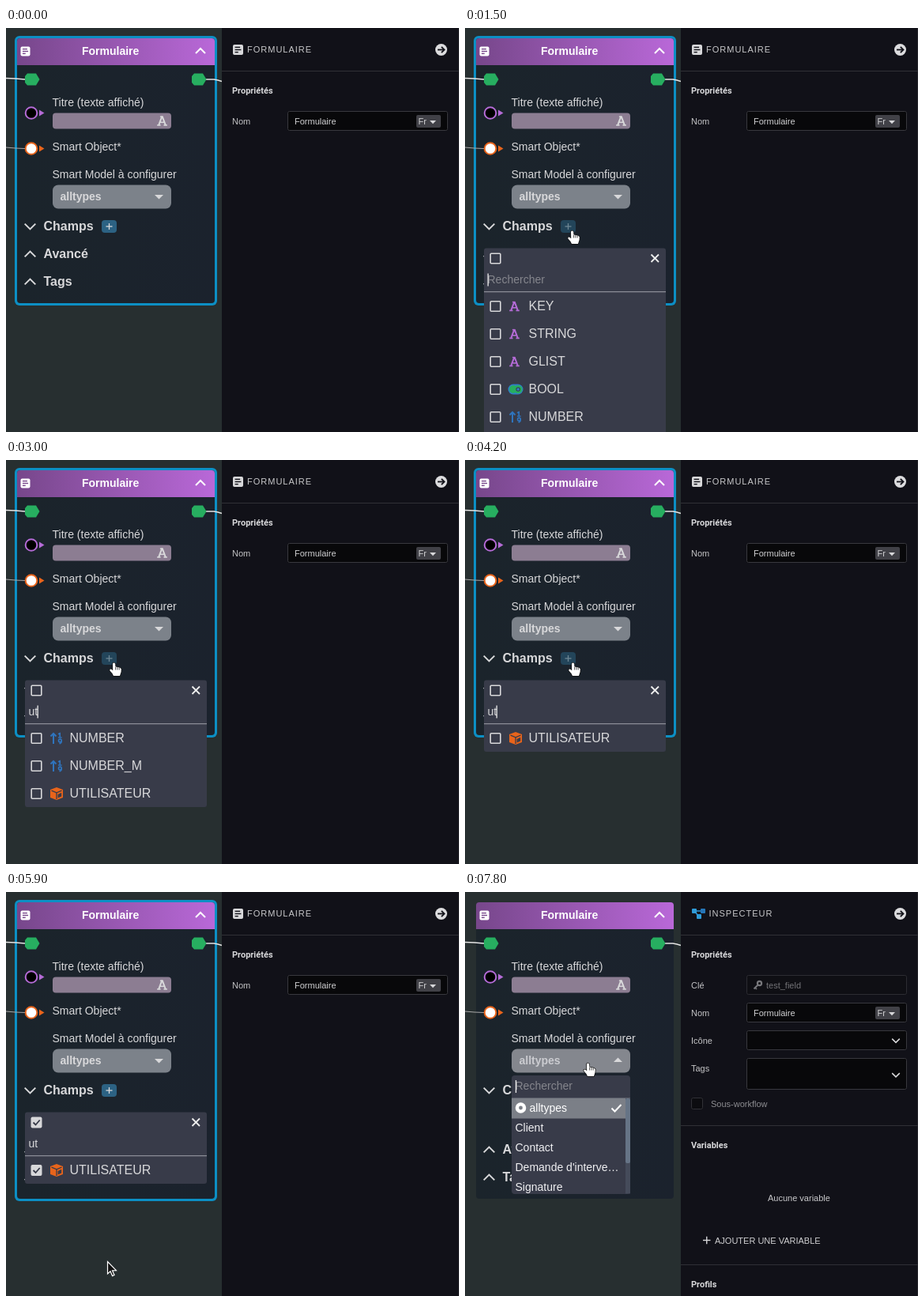
These frames come from a looping animation (573x511 px, 8 s). An HTML page with a canvas:

```html
<!DOCTYPE html>
<html lang="fr">
<head>
<meta charset="utf-8">
<title>Formulaire</title>
<style>
html, body { margin: 0; width: 100%; height: 100%; overflow: hidden; background: #272f30; }
canvas { display: block; width: 573px; height: 511px; }
</style>
</head>
<body>
<canvas id="stage" width="573" height="511"></canvas>
<script>
const LOOP = 8000, STEP = 100;
const ctx = document.getElementById('stage').getContext('2d');
const SANS = '"Liberation Sans", Arial, sans-serif';
const ROBOTO = 'Roboto, sans-serif';
const LIGHT = '#d8d8da', PURPLE = '#b46bd6', ORANGE = '#e8641b', GREEN = '#27ae60', BLUE = '#2f74bd';
const POPUP = '#383b49';

// start, end, x, y, shape: the pointer glides to x,y during start..end
const MOVES = [
  [200, 300, 251, 430, 'arrow'], [300, 700, 170, 318, 'arrow'], [700, 1000, 139, 260, 'arrow'],
  [1000, 1100, 135, 256, 'hand'], [1600, 1700, 134, 255, 'hand'], [2000, 2100, 135, 256, 'hand'],
  [2400, 2500, 136, 256, 'hand'], [4200, 4300, 137, 264, 'hand'], [4300, 4400, 140, 284, 'arrow'],
  [4400, 4500, 146, 304, 'arrow'], [4500, 4600, 152, 328, 'text'], [4700, 4800, 153, 334, 'text'],
  [4800, 4900, 154, 341, 'hand'], [5000, 5100, 148, 341, 'hand'], [5400, 5500, 138, 420, 'arrow'],
  [5500, 5600, 129, 466, 'arrow'], [5800, 5900, 128, 467, 'arrow'], [6400, 6900, 142, 341, 'arrow'],
  [6900, 7300, 155, 228, 'arrow'], [7300, 7500, 155, 216, 'hand']
];

function text(str, x, y, size, color = LIGHT, weight = 400, family = SANS, spacing = 0) {
  ctx.font = `${weight} ${size}px ${family}`;
  ctx.letterSpacing = spacing + 'px';
  ctx.fillStyle = color;
  ctx.fillText(str, x, y);
}
function rect(x, y, w, h, color, r = 0) {
  ctx.fillStyle = color;
  ctx.beginPath();
  ctx.roundRect(x, y, w, h, r);
  ctx.fill();
}
function frame(x, y, w, h, color, r = 0, width = 1) {
  ctx.strokeStyle = color;
  ctx.lineWidth = width;
  ctx.beginPath();
  ctx.roundRect(x, y, w, h, r);
  ctx.stroke();
}
function trace(pts) {
  ctx.beginPath();
  for (let i = 0; i < pts.length; i += 2) ctx.lineTo(pts[i], pts[i + 1]);
}
function line(color, width, ...pts) {
  ctx.strokeStyle = color;
  ctx.lineWidth = width;
  trace(pts);
  ctx.stroke();
}
function poly(color, ...pts) {
  ctx.fillStyle = color;
  trace(pts);
  ctx.fill();
}
function disc(x, y, r, fill, stroke, width = 2) {
  ctx.beginPath();
  ctx.arc(x, y, r, 0, 7);
  if (fill) { ctx.fillStyle = fill; ctx.fill(); }
  if (stroke) { ctx.strokeStyle = stroke; ctx.lineWidth = width; ctx.stroke(); }
}
function chevron(x, y, w, h, width, color = LIGHT) {
  line(color, width, x - w, y - h, x, y + h, x + w, y - h);
}
function at(x, y, draw) {
  ctx.save();
  ctx.translate(x, y);
  draw();
  ctx.restore();
}

function letterIcon(x, y, color) {
  at(x, y, () => {
    line(color, 2.1, -4.2, 5, -.4, -5, .4, -5, 4.2, 5);
    line(color, 1.6, -3, 1.8, 3, 1.8);
    line(color, 1.7, -6.3, 5.4, -2, 5.4);
    line(color, 1.7, 2, 5.4, 6.3, 5.4);
    line(color, 1.5, -2.6, -5.4, .8, -5.4);
  });
}
function boolIcon(x, y) {
  rect(x - 9.5, y - 6.5, 19, 13, '#2f80c8', 6.5);
  disc(x - 3, y, 5, GREEN);
  disc(x + 3.2, y, 4, POPUP, GREEN, 2.4);
  disc(x + 3.2, y, 1.8, '#2f80c8');
}
function numberIcon(x, y) {
  at(x, y, () => {
    line(BLUE, 2, -4, 7, -4, -5);
    line(BLUE, 2, -7.5, -2.5, -4, -6, -.5, -2.5);
    line(BLUE, 1.6, 2, -5.2, 4.2, -6.2, 4.2, -1.2);
    line(BLUE, 1.4, 2, -1, 6.6, -1);
    disc(4.4, 3, 1.9, null, BLUE, 1.6);
    line(BLUE, 1.6, 6.2, 3, 5.8, 5.6, 3.6, 7);
  });
}
function cubeIcon(x, y) {
  at(x, y, () => {
    poly(ORANGE, 0, -8, 8, -5, 8, 5, 0, 8, -8, 5, -8, -5);
    line(POPUP, 1.3, -6.5, -3.8, 0, -1.2, 6.5, -3.8);
    line(POPUP, 1.3, 0, -1.2, 0, 7);
    poly(POPUP, 1.6, 1, 6.2, -1.2, 6.2, 3.4, 1.6, 5.4);
  });
}
function formIcon(x, y, size, color, ink) {
  rect(x, y, size, size, color, 2);
  [[.2, .26, .5], [.2, .5, .6], [.2, .74, .32]].forEach(([a, b, w]) =>
    line(ink, 1.4, x + a * size, y + b * size, x + (a + w) * size, y + b * size));
}
function checkbox(x, y, on) {
  if (on) {
    rect(x - 7, y - 7, 14, 14, LIGHT, 2);
    line(POPUP, 1.8, x - 4, y, x - 1, y + 3, x + 4.2, y - 3);
  } else frame(x - 6.3, y - 6.3, 12.6, 12.6, LIGHT, 1, 1.6);
}
function caret(x, y, color = '#eee') { rect(x, y, 1.3, 16, color); }

function port(x, y, color, fill) {
  disc(x, y, 7.3, fill, color, 2);
  poly(color, x + 10, y - 4, x + 16.5, y, x + 10, y + 4);
}
function flowPort(x) {
  poly(GREEN, x, 61, x + 3, 57.5, x + 14, 57.5, x + 18.5, 65, x + 14, 72.5, x + 3, 72.5, x, 69);
}
function wires() {
  line('#e4e4e4', 1.6, 0, 63.5, 12, 64, 24, 65);
  line('#a8a8a8', 1, 0, 151, 12, 152, 24, 152.5);
  line('#e4e4e4', 1.6, 253, 65, 263, 65, 268, 66, 273, 67.5);
}

function section(label, y, open) {
  chevron(30.5, y + .5, 6.8, open ? 3.4 : -3.4, 2);
  text(label, 47.5, y + 5.5, 16, LIGHT, 700);
}
function card(t) {
  const selected = t < 6100, added = t >= 5100, opened = t >= 7800;
  const shift = added ? 40 : 0;
  const h = 335 + shift;
  if (selected) rect(11, 10, 256, h + 6, '#0c8fc4', 6);
  const body = ctx.createLinearGradient(14, 0, 264, 0);
  body.addColorStop(0, '#1b242b');
  body.addColorStop(1, '#1b222d');
  rect(14, 13, 250, h, body, 4);
  const head = ctx.createLinearGradient(14, 0, 264, 0);
  head.addColorStop(0, '#77478b');
  head.addColorStop(1, '#b968d8');
  rect(14, 13, 250, 34, head, [4, 4, 0, 0]);
  wires();
  formIcon(18.5, 23.5, 12, '#fff', '#77478b');
  text('Formulaire', 96, 34, 14, '#fff', 700);
  chevron(246, 29, 6, -3, 2, '#fff');
  flowPort(24);
  flowPort(235);
  port(32, 107.5, PURPLE, '#000');
  port(32, 152.5, ORANGE, '#fff');
  text('Titre (texte affiché)', 58.5, 99, 14);
  rect(59, 107.5, 150, 20, '#8c7d92', 4);
  letterIcon(197.5, 117.5, LIGHT);
  text('Smart Object*', 58.5, 155, 14);
  text('Smart Model à configurer', 58.5, 190, 14);
  rect(59, 198.5, 150, 30, opened ? '#84878e' : '#7c828a', 7);
  text('alltypes', 68.5, 218, 14, opened ? '#cbccd0' : LIGHT, 700);
  if (opened) poly(LIGHT, 188, 215, 193.5, 209.5, 199, 215);
  else poly(LIGHT, 188, 211, 199, 211, 193.5, 216.5);

  section('Champs', 250.5, true);
  const hover = t >= 1000 && t < 4300;
  rect(121, 243, 19, 16, hover ? '#23455a' : '#2c6283', 4);
  const plus = hover ? '#6f8794' : LIGHT;
  line(plus, 1.3, 126.5, 251, 134.5, 251);
  line(plus, 1.3, 130.5, 247, 130.5, 255);
  if (added) text('UTILISATEUR', 58.5, 291, 14);
  section('Avancé', 285.5 + shift, false);
  section('Tags', 320.5 + shift, false);
}

const FIELDS = [['KEY', letterIcon], ['STRING', letterIcon], ['GLIST', letterIcon], ['BOOL', boolIcon],
  ['NUMBER', numberIcon], ['NUMBER_M', numberIcon], ['UTILISATEUR', cubeIcon]];

function fieldPicker(t) {
  const typed = t >= 3000, checked = t >= 5100;
  const query = t < 3000 ? '' : t < 3100 ? 'U' : 'UT';
  const rows = FIELDS.filter(([name]) => name.includes(query));
  rect(24, 278.5, 230, 55.5 + 35 * rows.length, POPUP, 3);
  checkbox(38.5, 291.5, checked);
  line('#eee', 1.8, 235.5, 286.5, 245, 296);
  line('#eee', 1.8, 245, 286.5, 235.5, 296);
  text(typed ? 'ut' : 'Rechercher', 28.5, 323, 14, typed ? LIGHT : '#85868d');
  const blink = t < 2100 || (t >= 2600 && t < 3600) || (t >= 4200 && t < 4800);
  if (blink) caret(typed ? 39.5 : 28.5, 310.5);
  rect(24, 333, 230, 1.3, '#8b8d96');
  rows.forEach(([name, icon], i) => {
    const y = 352 + 35 * i;
    checkbox(38.5, y, checked);
    icon(icon === letterIcon ? 62.5 : 64, y, PURPLE);
    text(name, 80.5, y + 5, 16);
  });
}

function modelPicker() {
  rect(59, 232, 150, 150, POPUP, 4);
  text('Rechercher', 63.5, 250, 14, '#85868d');
  caret(63.8, 238);
  rect(59, 260.5, 150, 26, '#7b7f87');
  disc(70.5, 273, 4.6, null, '#fff', 4.4);
  text('alltypes', 81.5, 278, 14, '#fff');
  line('#fff', 2, 185.5, 273.5, 189.5, 277.5, 197.5, 269);
  ['Client', 'Contact', 'Demande d\'interve…', 'Signature'].forEach((name, i) =>
    text(name, 63.5, 303 + 25 * i, 14, '#f0f0f2'));
  rect(203, 261, 6, 120.5, '#454b5a');
  rect(203, 261, 6, 82, '#667486', 2);
}

function label(str, y) { text(str, 286, y, 11, '#c4c4c6'); }
function heading(str, y) { text(str, 286, y, 11, LIGHT, 700, ROBOTO); }
function input(y, h = 24, fill = '#08080a', border = '#38383e') {
  rect(356, y, 203, h + 1, fill, 2);
  frame(356.5, y + .5, 202, h, border, 2);
}
function nameField(y) {
  label('Nom', y + 4);
  input(y - 13);
  text('Formulaire', 365, y + 4, 11, '#d0d0d2');
  rect(519, y - 8, 31, 16, '#414147', 2);
  text('Fr', 521.5, y + 4, 11, '#d0d0d2');
  poly(LIGHT, 536, y - 1, 544, y - 1, 540, y + 3.2);
}
function divider(y) { rect(273, y, 300, 1, '#303036'); }

function panel(t) {
  rect(273, 0, 300, 511, '#111118');
  rect(572, 0, 1, 511, '#25252b');
  divider(54);
  disc(550.5, 27.5, 7.5, '#dcdcde');
  line('#111118', 1.8, 546, 27.5, 554, 27.5);
  line('#111118', 1.8, 550.8, 23.8, 554.5, 27.5, 550.8, 31.2);
  heading('Propriétés', 83);
  if (t < 6100) {
    formIcon(287, 21, 13, LIGHT, '#111118');
    text('FORMULAIRE', 305, 31, 11, '#c8c8ca', 400, SANS, 1);
    nameField(118);
    return;
  }
  line('#2f8fcb', 1.6, 291, 24, 300, 24);
  line('#2f8fcb', 1.6, 291, 25, 295.5, 31);
  rect(287, 21, 6, 6, '#2f9bd8', 1);
  rect(298, 21, 6, 6, '#2576b8', 1);
  rect(293, 28, 6, 6, '#2f9bd8', 1);
  text('INSPECTEUR', 308.5, 31, 11, '#c8c8ca', 400, SANS, 1);

  label('Clé', 122);
  input(105, 24, '#0f0f14', '#2c2c32');
  disc(372.5, 115.5, 2.6, null, '#77777b', 2.2);
  line('#77777b', 2, 370.5, 117.5, 365.5, 122.5);
  line('#77777b', 1.6, 367, 121, 369, 123);
  text('test_field', 381, 122, 11, '#737377');
  nameField(153);
  label('Icône', 192);
  input(175);
  chevron(545, 188, 4.8, 2.4, 1.5);
  label('Tags', 227);
  input(210, 39);
  chevron(545, 231.5, 4.8, 2.4, 1.5);
  rect(286, 260, 15, 15, '#0c0c10', 2);
  frame(286.5, 260.5, 14, 14, '#303036', 2);
  text('Sous-workflow', 311, 272, 11, '#8d8d91');
  divider(295);
  heading('Variables', 324);
  text('Aucune variable', 383, 391, 11, '#c8c8ca');
  line(LIGHT, 1.4, 301, 440.5, 310.5, 440.5);
  line(LIGHT, 1.4, 305.75, 435.8, 305.75, 445.2);
  text('AJOUTER UNE VARIABLE', 316, 445, 11, '#d0d0d2');
  divider(471);
  heading('Profils', 500);
}

const SHAPES = {
  arrow() {
    trace([.5, .5, .5, 16, 4, 12.8, 6.6, 18.6, 9, 17.5, 6.5, 11.8, 11.4, 11.6]);
    ctx.closePath();
    ctx.fillStyle = '#111';
    ctx.fill();
    ctx.strokeStyle = '#fff';
    ctx.lineWidth = 1.2;
    ctx.stroke();
  },
  hand() {
    trace([-1, 1.5, 0, .5, 1.5, .8, 2.2, 2, 2.4, 5.4, 8, 6.6, 9.8, 8.2, 9.6, 12, 8, 17,
      0, 17, -1.5, 14, -4.6, 10.6, -4.6, 8.8, -3, 8.6, -.8, 10.2]);
    ctx.closePath();
    ctx.strokeStyle = '#111';
    ctx.lineWidth = 1.4;
    ctx.stroke();
    ctx.fillStyle = '#fff';
    ctx.fill();
    [2.6, 4.9, 7.2].forEach(x => line('#222', .8, x, 6, x, 9.5));
  },
  text() {
    line('#fff', 1.4, -3, -8, 3, -8);
    line('#fff', 1.4, 0, -8, 0, 8);
    line('#fff', 1.4, -3, 8, 3, 8);
  }
};
function pointer(t) {
  if (t < 300) return;
  const i = MOVES.findLastIndex(m => m[0] <= t);
  const [start, end, x, y, shape] = MOVES[i];
  const [, , px, py] = MOVES[Math.max(i - 1, 0)];
  const k = Math.min(1, (t - start) / (end - start));
  at(Math.round(px + (x - px) * k), Math.round(py + (y - py) * k), SHAPES[shape]);
}

function draw(t) {
  rect(0, 0, 573, 511, '#272f30');
  card(t);
  if (t >= 1500 && t < 6100) fieldPicker(t);
  if (t >= 7800) modelPicker();
  panel(t);
  pointer(t);
}
const begin = performance.now();
function tick() {
  const t = (performance.now() - begin) % LOOP;
  draw(Math.floor(t / STEP) * STEP);
  requestAnimationFrame(tick);
}
tick();
</script>
</body>
</html>
```
